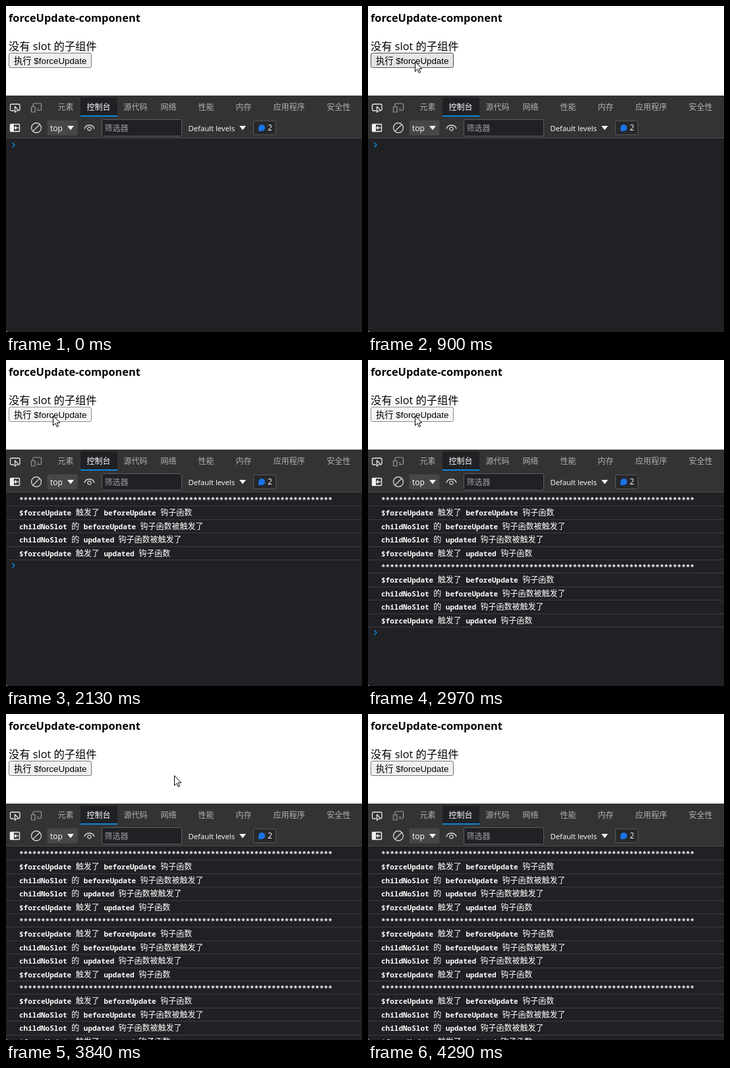
An HTML page with a canvas that plays this animation: 540x495 px, repeating every 5070 ms.

```html
<!DOCTYPE html>
<html lang="zh">
<head>
<meta charset="utf-8">
<title>forceUpdate-component</title>
<style>
html, body { margin: 0; width: 100%; height: 100%; overflow: hidden; background: #fff; }
canvas { display: block; width: 540px; height: 495px; }
</style>
</head>
<body>
<canvas id="stage" width="540" height="495"></canvas>
<script>
const ctx = document.getElementById('stage').getContext('2d');
const LOOP = 5070, STEP = 30, ROW = 20.4, TOP = 201;
const CJK = '"Noto Sans CJK SC", "Noto Sans CJK", sans-serif';
const UI = '"Open Sans", ' + CJK;
const MONO = '600 11px "Noto Sans Mono", monospace';
const BLUE = '#1a73e8';

// Pointer tips, one per step
const enter = [[530,31],[495,36],[473,39],[404,53],[340,65],[277,77],[253,82],[214,91],[185,98],
  [155,103],[134,107],[122,109],[109,109],[101,109],[93,108],[85,106],[78,102],[72,95],
  [72,93],[72,91],[71,89],[71,87],[71,86],[71,84]];
const leave = [[71,84],[74,85],[82,87],[95,90],[113,93],[135,95],[160,96],[188,96],[218,95],
  [255,93],[290,92],[318,93],[348,94],[372,99],[399,119],[440,138],[488,142],[499,149],
  [507,152],[514,153],[520,154],[526,154],[531,154],[536,154]];

// Mouse button held down; releasing it prints one group of lines
const presses = [[1110, 1200], [2130, 2310], [2970, 3120]];

const tabs = [['元素', 78.5], ['控制台', 122.5], ['源代码', 178.5], ['网络', 234.5],
  ['性能', 291.5], ['内存', 348.5], ['应用程序', 405.5], ['安全性', 486.5]];

const logs = [
  ['*'.repeat(72)],
  ['$forceUpdate ', '触发了', ' beforeUpdate ', '钩子函数'],
  ['childNoSlot ', '的', ' beforeUpdate ', '钩子函数被触发了'],
  ['childNoSlot ', '的', ' updated ', '钩子函数被触发了'],
  ['$forceUpdate ', '触发了', ' updated ', '钩子函数']
];

function rect(x, y, w, h, fill) {
  ctx.fillStyle = fill;
  ctx.fillRect(x, y, w, h);
}

function box(x, y, w, h, r, fill, line) {
  ctx.beginPath();
  ctx.roundRect(x + .5, y + .5, w - 1, h - 1, r);
  if (fill) { ctx.fillStyle = fill; ctx.fill(); }
  if (line) { ctx.strokeStyle = line; ctx.lineWidth = 1; ctx.stroke(); }
}

function text(s, x, y, font, fill) {
  ctx.font = font;
  ctx.fillStyle = fill;
  ctx.fillText(s, x, y);
  return x + ctx.measureText(s).width;
}

function shape(d, x, y, fill, line, width = 1) {
  const p = new Path2D(d);
  ctx.save();
  ctx.translate(x, y);
  ctx.lineWidth = width;
  ctx.lineJoin = 'round';
  if (fill) { ctx.fillStyle = fill; ctx.fill(p); }
  if (line) { ctx.strokeStyle = line; ctx.stroke(p); }
  ctx.restore();
}

function cross(x, y) {
  shape('M-2.5 -2.5L2.5 2.5M2.5 -2.5L-2.5 2.5', x, y, null, '#f0f0f0', 1.4);
}

function arrow(x, y) {
  shape('M.5 .5V15.5L4 12.2L6.3 17.5L8.5 16.6L6.3 11.3H10.8Z', x, y, '#fff', '#000');
}

function hand(x, y) {
  shape('M-2 2Q-2 0 0 0Q2 0 2 2V7Q3.5 6 5 7.4Q6.8 6.8 7.8 8.4Q10 8 10 10.2V14.5' +
    'Q9.8 17.5 8.2 19V22H-2V19.5L-6.5 13.4Q-7.5 11.5 -5.8 10.8Q-4.5 10.5 -2 13.4Z',
    x, y, '#fff', '#111');
  shape('M2 7V11M5 7.5V11.5M7.8 8.5V12', x, y, null, '#111');
}

function drawPage(hover, down) {
  rect(0, 0, 540, 136, '#fff');
  text('forceUpdate-component', 4, 24, 'bold 16.35px ' + UI, '#000');
  text('没有 slot 的子组件', 4, 67, '16.3px ' + UI, '#000');
  const [fill, line] = down ? ['#f5f5f5', '#8d8d8d'] : hover ? ['#e5e5e5', '#4f4f4f'] : ['#efefef', '#767676'];
  box(4, 71, 126, 23, 2.5, fill, line);
  text('执行 $forceUpdate', 12, 88, '13.333px "Liberation Sans", ' + CJK, '#000');
}

function drawTabs(hovered) {
  rect(0, 136, 540, 65, '#333');
  rect(113, 139, 56, 29, '#202124');
  rect(113, 166, 56, 2, '#0a84d8');
  if (hovered === 6) rect(396, 139, 81, 28, '#474747');
  if (hovered === 7) rect(477, 139, 63, 28, '#474747');
  tabs.forEach(([name, x], i) => {
    const on = i === 1;
    text(name, x, 158, (on ? '500 ' : '') + '12px ' + CJK, on || i === hovered ? '#fff' : '#adb0b3');
  });
  if (hovered === 6) cross(466, 154);
  if (hovered === 7) cross(534, 154);

  shape('M6.5 10.5H2.5Q.5 10.5 .5 8.5V2.5Q.5 .5 2.5 .5H13Q15 .5 15 2.5V8.5Q15 9.5 14 10', 6, 148.5, null, '#e8e8e8', 1.3);
  shape('M7.5 4.5V13.5L10 11H13.5Z', 6, 148, '#333', '#e8e8e8', 1.2);
  shape('M3 5V2Q3 .5 4.5 .5H14Q15.5 .5 15.5 2V9.5Q15.5 11 14 11H9M.5 5.5H6V13.5H.5ZM9 8.5H12', 38, 147.5, null, '#9a9da0', 1.2);
}

function drawToolbar() {
  shape('M1.5 .5H13.5Q14.5 .5 14.5 1.5V10.5Q14.5 11.5 13.5 11.5H1.5Q.5 11.5 .5 10.5V1.5Q.5 .5 1.5 .5Z', 6, 179, null, '#f0f0f0', 1.4);
  rect(6, 179, 6, 12, '#f0f0f0');
  shape('M13 6H19M15.5 3.5L13 6L15.5 8.5', 0, 179, null, '#f0f0f0', 1.4);
  shape('M7.5 0A7.5 7.5 0 1 1 -7.5 0A7.5 7.5 0 1 1 7.5 0M-5.3 5.3L5.3 -5.3', 46, 185, null, '#d5d5d5', 1.3);

  box(62, 173, 47, 24, 2, '#474747');
  text('top', 67, 190, '500 12px ' + UI, '#fff');
  shape('M0 0H10L5 6.5Z', 93, 182, '#f4f4f4');

  shape('M0 5.5Q1.5 0 7.5 0Q13.5 0 15 5.5', 119, 181, null, '#d8d8d8', 1.3);
  shape('M10.2 5.5A2.7 2.7 0 1 1 4.8 5.5A2.7 2.7 0 1 1 10.2 5.5', 119, 181, null, '#d8d8d8', 1.3);

  box(145, 172, 122, 26, 2, '#202124', '#5c5e61');
  text('筛选器', 149.5, 190, '12px ' + CJK, '#9a9da0');
  text('Default levels', 276.5, 190, '500 11.3px ' + UI, '#fff');
  shape('M0 0H10L5 6.5Z', 354, 182, '#f4f4f4');

  box(375, 174, 35, 22, 1, '#27282a', '#55585b');
  shape('M5 0A5 5 0 0 1 0 5H-5V0A5 5 0 0 1 5 0Z', 388, 185, BLUE);
  text('2', 397, 189, '500 12px ' + UI, '#fff');
}

function drawConsole(groups) {
  rect(0, 200, 540, 1, '#484b4e');
  rect(0, TOP, 540, 294, '#202124');
  const count = groups * logs.length;
  for (let i = 0; i < count; i++) {
    const y = Math.round(TOP + i * ROW + 15);
    let x = 20;
    logs[i % logs.length].forEach((s, k) => {
      x = text(s, x, y, k % 2 ? '12px ' + CJK : MONO, '#fff');
    });
    rect(0, Math.round(TOP + (i + 1) * ROW), 540, 1, '#3b3d40');
  }
  shape('M0 0L3.5 3.5L0 7', 9.5, 207.5 + Math.round(count * 20.25), null, '#0b7fd0', 1.7);
  shape('M0 0V-4Q0 0 4 0Z', 0, 495, '#8a8a8a');
}

function pointerAt(t) {
  if (t < 210 || t >= 4290) return null;
  const path = t < 3570 ? enter : leave;
  const i = Math.floor((t - (t < 3570 ? 210 : 3570)) / STEP + 1e-6);
  return path[Math.min(i, path.length - 1)];
}

function draw(t) {
  const tip = pointerAt(t);
  const over = tip && tip[0] >= 4 && tip[0] < 130 && tip[1] >= 71 && tip[1] < 94;
  const down = presses.some(([a, b]) => t >= a && t < b);
  const groups = presses.filter(p => t >= p[1]).length;
  const tab = t >= 4020 && t < 4080 ? 6 : t >= 4080 && t < 4290 ? 7 : -1;
  drawPage(over, down);
  drawTabs(tab);
  drawToolbar();
  drawConsole(groups);
  if (tip) (tab > 0 ? hand : arrow)(...tip);
}

const start = performance.now();
function tick() {
  draw((performance.now() - start) % LOOP);
  requestAnimationFrame(tick);
}
tick();
</script>
</body>
</html>
```
